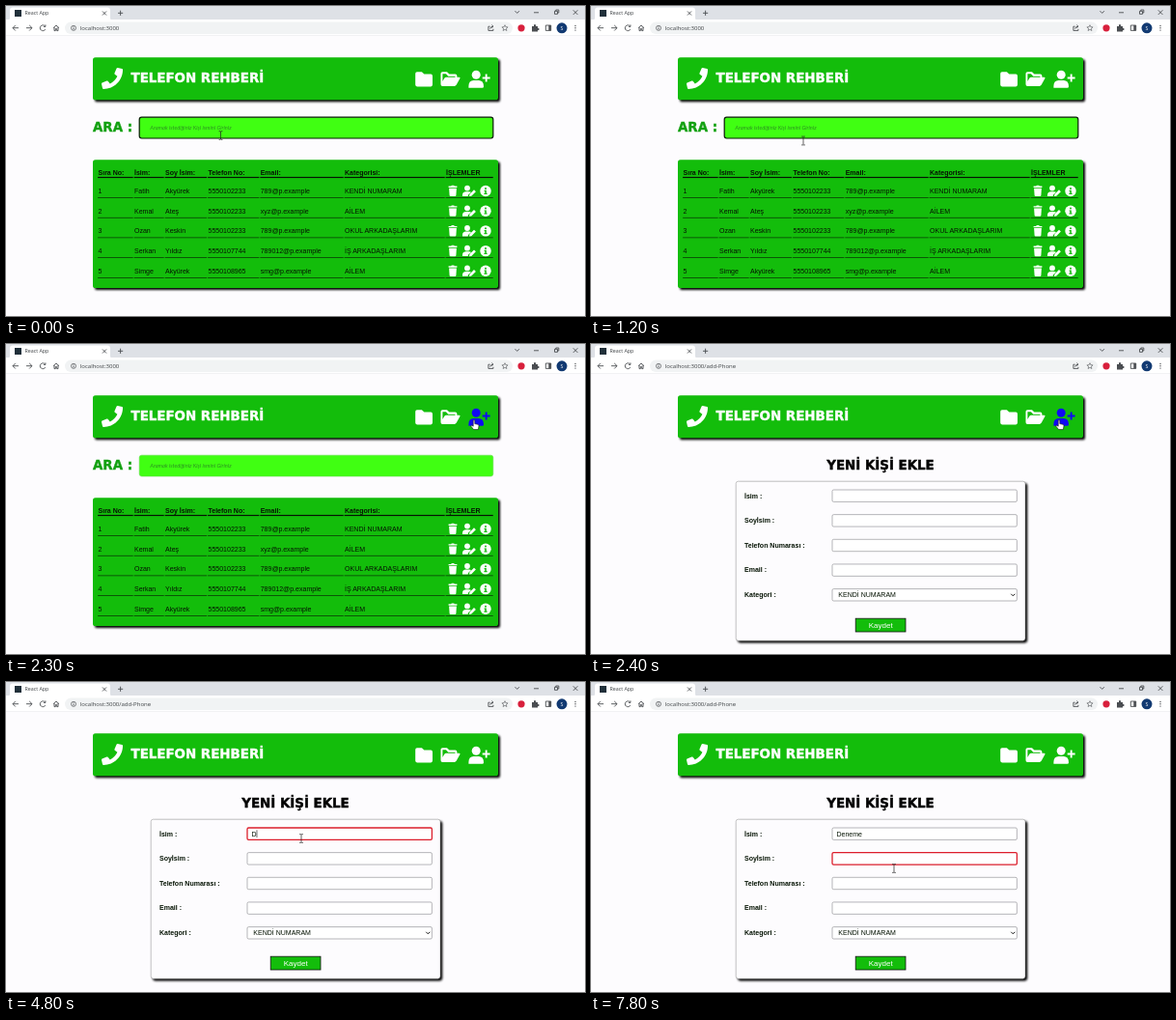
An HTML page that plays this animation: 600x321 px, repeating every 8 s.

```html
<!DOCTYPE html>
<html lang="tr">
<head>
<meta charset="utf-8">
<title>React App</title>
<style>
  html, body { margin: 0; width: 100%; height: 100%; overflow: hidden; background: #fdfcfe; }
  svg { display: block; width: 100vw; height: 100vh; }
  text { font: 7.03px "Liberation Sans", Arial, sans-serif; fill: #061404; white-space: pre; }
  .bold { font-weight: bold; }
  .head { font: bold 13.4px "DejaVu Sans", sans-serif; stroke-width: .4; }
  .hint { font: italic 5.7px Lato, sans-serif; fill: #2c8f22; }
  .chrome { font: 5.3px "Open Sans", sans-serif; fill: #3c4043; }
  .url { font-size: 6px; }
  .card { filter: drop-shadow(2px 2px 1.1px #000); }
  .line { fill: none; stroke: #4a4d51; stroke-width: .9; }
</style>
</head>
<body>
<svg id="stage" viewBox="0 0 600 321"></svg>
<script>
const LOOP = 8000, STEP = 100;
const GREEN = '#13bd0b', INK = '#061404';

const people = [
  ['Fatih', 'Akyürek', '5550102233', '789@p.example', 'KENDİ NUMARAM'],
  ['Kemal', 'Ateş', '5550102233', 'xyz@p.example', 'AİLEM'],
  ['Ozan', 'Keskin', '5550102233', '789@p.example', 'OKUL ARKADAŞLARIM'],
  ['Serkan', 'Yıldız', '5550107744', '789012@p.example', 'İŞ ARKADAŞLARIM'],
  ['Simge', 'Akyürek', '5550108965', 'smg@p.example', 'AİLEM'],
];
const titles = ['Sıra No:', 'İsim:', 'Soy İsim:', 'Telefon No:', 'Email:', 'Kategorisi:', 'İŞLEMLER'];
const wide = { cols: [95.5, 133, 165, 209.5, 263.7, 351, 456], icons: [463, 480, 497] };
const narrow = { cols: [95.5, 141, 176.3, 230, 296, 382.5, 445], icons: [454, 474, 495] };
const fields = ['İsim :', 'Soyİsim :', 'Telefon Numarası :', 'Email :', 'Kategori :'];

// pointer stops: time, x, y, shape held until the next stop
const pointer = [
  [0, 222.5, 134, 'beam'], [300, 220, 139.5, 'beam'], [1300, 220, 139.5, 'beam'],
  [1400, 262, 134, 'beam'], [1700, 420, 112, 'arrow'], [1800, 455, 103, 'arrow'],
  [2000, 485, 79, 'hand'], [2400, 485, 79, 'hand'], [2500, 455, 90, 'arrow'],
  [2900, 298, 144, 'arrow'], [3000, 298, 144, 'arrow'], [3200, 302, 151, 'arrow'],
  [3300, 302, 151, 'arrow'], [3600, 306, 162, 'beam'], [6600, 306, 162, 'beam'],
  [6700, 312, 170, 'beam'], [6900, 312, 170, 'beam'], [7200, 314, 193, 'beam'],
  [LOOP, 314, 193, 'beam'],
];
// time, text in the first field, focused field, caret shown
const typing = [
  [0, '', -1, 0], [3800, '', 0, 1], [4300, '', 0, 0], [4800, 'D', 0, 1], [5000, 'De', 0, 1],
  [5500, 'De', 0, 0], [5600, 'Den', 0, 1], [5800, 'Dene', 0, 1], [6000, 'Denem', 0, 1],
  [6200, 'Deneme', 0, 1], [6700, 'Deneme', 0, 0], [7300, 'Deneme', 1, 1], [7800, 'Deneme', 1, 0],
];

const text = (x, y, s, cls = '', more = '') => `<text x="${x}" y="${y}" class="${cls}" ${more}>${s}</text>`;
const rect = (x, y, w, h, fill, more = '') =>
  `<rect x="${x}" y="${y}" width="${w}" height="${h}" fill="${fill}" ${more}/>`;
const path = (d, more = '') => `<path d="${d}" ${more}/>`;
const disc = (x, y, r, fill) => `<circle cx="${x}" cy="${y}" r="${r}" fill="${fill}"/>`;
const at = (x, y, s, more = '') => `<g transform="translate(${x} ${y})" ${more}>${s}</g>`;
const line = d => path(d, 'class="line"');
const heading = (x, y, s, color, more = '') => text(x, y, s, 'head', `style="fill:${color};stroke:${color}" ${more}`);
const last = (list, t) => list.filter(step => step[0] <= t).pop();

function browser() {
  const ring = (x, y, r) => `<circle cx="${x}" cy="${y}" r="${r}" class="line" style="stroke-width:.7"/>`;
  return rect(0, 0, 600, 31, '#dee1e6') +
    path('M2 14.5q2 0 2-2v-8q0-3 3-3h98q3 0 3 3v8q0 2 2 2z', 'fill="#fff"') +
    rect(0, 14, 600, 17, '#fff') + rect(0, 30.5, 600, .5, '#e4e5e8') +
    rect(9, 4, 7, 7, '#20303a') + text(19.5, 9.3, 'React App', 'chrome') +
    line('M100 5.5l4 4m0-4l-4 4M116 7.3h5.2m-2.6-2.6v5.2') +
    line('M527.5 5.2l2.2 2.2 2.2-2.2M547 6.8h5M568.5 5.3h3v3h-3zM569.8 5.3v-1.3h3v3h-1.3M587.8 4.3l4.6 4.6m0-4.6l-4.6 4.6') +
    line('M13 22.7h-6m2.8-2.8l-2.8 2.8 2.8 2.8M21 22.7h6m-2.8-2.8l2.8 2.8-2.8 2.8') +
    line('M40.5 21a2.9 2.9 0 1 0 .2 3.2M40.9 19.4v2h-2') +
    line('M49 22.7l3-2.7 3 2.7M50 22v3.6h1.3v-2h1.4v2h1.3v-3.6') +
    rect(61, 16.6, 464, 12.4, '#f1f3f4', 'rx="6.2"') +
    ring(70, 22.8, 2.5) + line('M70 22.5v1.7M70 21.2v.6') +
    line('M501.5 21.2h-1.6v4.2h5v-1.6M501.7 23.6q.3-2.4 3-2.4m-1.3-1.5l1.6 1.5-1.6 1.5') +
    path('M517 19.7l.9 2 2.2.2-1.7 1.4.5 2.2-1.9-1.2-1.9 1.2.5-2.2-1.7-1.4 2.2-.2z', 'class="line" style="stroke-width:.6"') +
    disc(534, 22.8, 3.6, '#d8203c') +
    path('M545 21h2q-.5-1.9 1-1.9t1 1.9h2v2q1.6-.4 1.6 1t-1.6 1v1.4h-6z', 'fill="#4a4d51"') +
    line('M559.3 20h5.4v5.4h-5.4z') + rect(562.3, 20, 2.4, 5.4, '#4a4d51') +
    disc(576, 22.8, 5.5, '#123a72') +
    text(576, 24.7, 'S', 'chrome', 'text-anchor="middle" style="fill:#fff"') +
    [20.5, 22.8, 25.1].map(y => disc(590, y, .7, '#4a4d51')).join('');
}

function banner(hover) {
  const phone = 'M493 25l-104-24q-20-4-28 14l-48 112q-6 16 7 28l61 50q-58 120-177 177l-50-61q-11-12-28-7l-112 48q-17 9-14 27l24 104q5 19 24 19c256 0 464-208 464-464q0-19-19-23z';
  const person = disc(487.2, 71.3, 4.5, 'inherit').replace('fill="inherit"', '') +
    path('M479.4 84.8v-1.8q0-6 5.4-6h4.8q5.4 0 5.4 6v.4q0 1.4-1.4 1.4zM496.7 70.6h1.9v3h3v1.9h-3v3h-1.9v-3h-3v-1.9h3z');
  return rect(90, 53.3, 420, 44, GREEN, 'rx="2.6" class="card"') +
    `<g fill="#fff">${path(phone, 'transform="translate(99 64) scale(.043)"')}` +
    path('M426 68.2h4.9l2.5 2.4h6.8q1.8 0 1.8 1.8v9.2q0 1.8-1.8 1.8h-14.2q-1.8 0-1.8-1.8v-11.6q0-1.8 1.8-1.8z') +
    path('M450.5 81v-11q0-1.8 1.8-1.8h4.7l2.4 2.4h6.2q1.8 0 1.8 1.8v1.5h-1.9v-1.2h-7.2l-2.4-2.4h-3.5v7.6l1.9-3.2q.6-1 1.8-1h13.5q1.4 0 .8 1.2l-3.6 6.6q-.8 1.4-2.2 1.4h-12.3q-1.8 0-1.8-1.9z') +
    `</g><g fill="${hover ? '#1008f5' : '#fff'}">${person}</g>` +
    heading(129.5, 78.5, 'TELEFON REHBERİ', '#fff');
}

function rowIcons(xs, y) {
  const bin = path('M-4.4-5h2.6l.6-.8h2.4l.6.8h2.6v1.4h-8.8zM-3.9-2.8h7.8l-.5 7.4q-.1 1-1.1 1h-4.6q-1 0-1.1-1z');
  const edit = disc(-2, -2.9, 2.9, '#fff') +
    path('M-7 5.5v-1.2q0-3.6 3.6-3.6h3.2q1.4 0 2.2.6L-1 4l-.3 1.5zM0 5.6l.4-2.2 4.6-4.6 1.9 1.9-4.6 4.6z');
  const info = disc(0, 0, 5.7, '#fff') + disc(0, -2.6, 1, GREEN) +
    path('M-1.4-.8h2.2v3h.8v1.2h-3.2v-1.2h.9v-1.8h-.7z', `fill="${GREEN}"`);
  return [bin, edit, info].map((icon, i) => at(xs[i], y, icon, 'fill="#fff"')).join('');
}

function table(rows, { cols, icons }) {
  const rule = (y, h) => cols.map((x, i) => rect(x - .4, y, (cols[i + 1] || 506) - x - .9, h, INK)).join('');
  let out = rect(90, 159.3, 420, 29.3 + rows.length * 20.7, GREEN, 'rx="2.6" class="card"') +
    titles.map((s, i) => text(cols[i], 174.9, s, 'bold')).join('') + rule(176.9, 1.2);
  rows.forEach((row, i) => {
    const y = 194 + i * 20.7;
    out += [i + 1, ...row].map((s, c) => text(cols[c], y, s)).join('') +
      rule(y + 4.2, .6) + rowIcons(icons, y - 2.5);
  });
  return out;
}

function listPage(t) {
  const query = t >= 300 && t < 1000 ? 'm' : '';
  const focused = t < 2200;
  const found = people.filter(p => p[0].toLowerCase().includes(query));
  const edge = focused ? 'stroke="#041a02" stroke-width="1.2"' : 'stroke="#5fdc48" stroke-width=".6"';
  return heading(90, 129.8, 'ARA :', '#12a010') +
    rect(138.2, 115.2, 366.6, 21.8, '#40ff12', `rx="2.4" ${edge}`) +
    (query
      ? text(149.5, 128, query, 'hint', `style="fill:${INK}"`) + rect(154.8, 123, .6, 6.4, INK)
      : text(149.3, 128.3, 'Aramak istediğiniz Kişi ismini Giriniz', 'hint')) +
    table(found, query ? narrow : wide);
}

function formPage(t) {
  const [, name, focus, caret] = last(typing, t);
  let out = heading(300, 129.6, 'YENİ KİŞİ EKLE', '#000', 'text-anchor="middle"') +
    rect(150.2, 142.2, 299.8, 165, '#fdfcfe', 'rx="2.4" class="card" stroke="#8a8a8a" stroke-width=".5"');
  fields.forEach((label, i) => {
    const y = 157.2 + i * 25.65;
    const edge = i === focus ? 'stroke="#dc1f2c" stroke-width="1.3"' : 'stroke="#85858a" stroke-width=".6"';
    out += text(159, y + 2.3, label, 'bold') + rect(250, y - 6.2, 191.4, 12.4, '#fff', `rx="1.4" ${edge}`);
  });
  const widths = { D: .722, e: .556, n: .556, m: .833 };
  const typed = focus === 0 ? [...name].reduce((sum, ch) => sum + widths[ch] * 7.03, 0) : 0;
  return out + text(254.5, 159.7, name) +
    (caret ? rect(254.6 + typed, 153.3 + focus * 25.65, .6, 7.8, '#111') : '') +
    text(256.3, 262.4, 'KENDİ NUMARAM') +
    path('M435.3 258.8l2 2 2-2', 'fill="none" stroke="#111" stroke-width="1"') +
    rect(274.2, 284.2, 51.8, 13.8, GREEN, 'stroke="#111" stroke-width=".8"') +
    text(300.2, 293.9, 'Kaydet', '', 'text-anchor="middle" style="font-size:8px;fill:#fff"');
}

const shapes = {
  beam: path('M-1.9-4.4h1.4l.5.4.5-.4h1.4M0-4v8M-1.9 4.4h1.4l.5-.4.5.4h1.4', 'fill="none" stroke="#222" stroke-width=".7"'),
  arrow: path('M0 0v7.8l1.8-1.7 1.2 2.8 1.2-.5-1.2-2.7h2.5z', 'fill="#fff" stroke="#111" stroke-width=".6"'),
  hand: path('M-.8 0q.8-.8 1.6 0v3.6l3.2.7q1.1.3 1 1.5l-.6 3.8h-4.8l-2.7-3.4q-.2-1 .9-1l1.4 1z', 'fill="#fff" stroke="#111" stroke-width=".6"'),
};

function cursor(t) {
  const i = pointer.findIndex(stop => stop[0] > t);
  const [t0, x0, y0, shape] = pointer[i - 1], [t1, x1, y1] = pointer[i];
  const k = (t - t0) / (t1 - t0);
  return at(x0 + (x1 - x0) * k, y0 + (y1 - y0) * k, shapes[shape]);
}

const stage = document.getElementById('stage');
const frame = browser();
const start = performance.now();
let shown = -1;

function draw(now) {
  const t = Math.floor(Math.max(0, now - start) % LOOP / STEP) * STEP;
  if (t !== shown) {
    shown = t;
    const form = t >= 2400;
    stage.innerHTML = rect(0, 0, 600, 321, '#fdfcfe') + frame +
      text(76.8, 25, 'localhost:3000' + (form ? '/add-Phone' : ''), 'chrome url') +
      banner(t >= 2000 && t < 2500) + (form ? formPage(t) : listPage(t)) + cursor(t);
  }
  requestAnimationFrame(draw);
}
draw(start);
</script>
</body>
</html>
```
